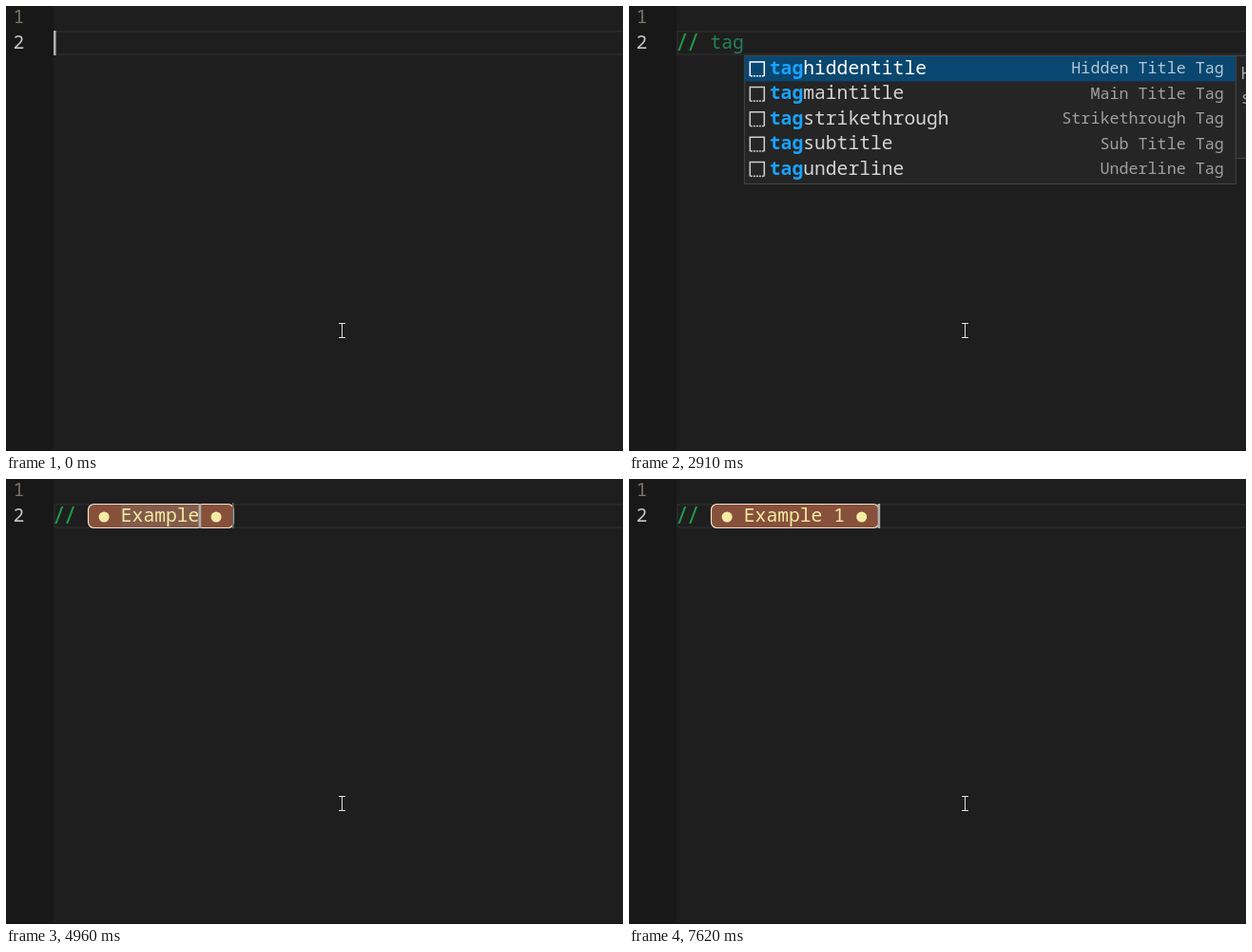
Recreate the animation shown at these times as an HTML page with a canvas. Size 649 by 469 pixels, loop 8000 ms.

```html
<!DOCTYPE html>
<html lang="en">
<head>
<meta charset="utf-8">
<title>Editor snippet</title>
<style>
html, body { margin: 0; width: 100%; height: 100%; overflow: hidden; background: #1e1e1e; }
canvas { display: block; }
</style>
</head>
<body>
<canvas id="c" width="649" height="469"></canvas>
<script>
const ctx = document.getElementById('c').getContext('2d');
const LOOP = 8000, CHAR = 11.8, LEFT = 50, ROW = 26.4;
const MONO = '"Noto Sans Mono", "DejaVu Sans Mono", monospace';
const col = n => LEFT + n * CHAR;

const ITEMS = [
  ['taghiddentitle', 'Hidden Title Tag'],
  ['tagmaintitle', 'Main Title Tag'],
  ['tagstrikethrough', 'Strikethrough Tag'],
  ['tagsubtitle', 'Sub Title Tag'],
  ['tagunderline', 'Underline Tag'],
  ['trycatch', 'Try-Catch Statement']
];

// Each step starts at `at`; caret is a column, null while blinked off.
const MAIN = 'Main Title Text';
const STEPS = [
  { at: 0, caret: 0 },
  { at: 200, typed: '/', caret: 1 },
  { at: 460, typed: '//', caret: 2 },
  { at: 990, typed: '//', caret: null },
  { at: 1060, typed: '//', caret: 3 },
  { at: 1590, typed: '//', caret: null },
  { at: 1990, typed: '// t', caret: 4, pick: 0 },
  { at: 2250, typed: '// ta', caret: 5, pick: 0 },
  { at: 2450, typed: '// tag', caret: 6, pick: 0 },
  { at: 2910, typed: '// tag', caret: null, pick: 0 },
  { at: 3440, typed: '// tag', caret: 6, pick: 1 },
  { at: 3900, tag: MAIN, caret: 21, selected: true, live: true },
  { at: 4430, tag: MAIN, caret: 21, selected: true, live: true, boxed: true },
  { at: 4560, tag: MAIN, caret: null, selected: true, live: true, boxed: true },
  { at: 4960, tag: 'Example', caret: 13, live: true, boxed: true },
  { at: 5640, tag: 'Example', caret: null, live: true, boxed: true },
  { at: 6040, tag: 'Example ', caret: 14, live: true, boxed: true },
  { at: 6570, tag: 'Example ', caret: null, live: true, boxed: true },
  { at: 6700, tag: 'Example 1', caret: 15, live: true, boxed: true },
  { at: 7160, tag: 'Example 1', caret: null, live: true, boxed: true },
  { at: 7620, tag: 'Example 1', caret: 18, boxed: true }
];

function rect(x, y, w, h, fill) {
  ctx.fillStyle = fill;
  ctx.fillRect(x, y, w, h);
}

function frame(x, y, w, h, fill, line) {
  rect(x, y, w, h, line);
  rect(x + 1, y + 1, w - 2, h - 2, fill);
}

// Writes on a fixed grid so that columns line up.
function write(str, x, y, fill, size = 19.67, step = CHAR, weight = 400) {
  ctx.font = `${weight} ${size}px ${MONO}`;
  ctx.textAlign = 'center';
  ctx.fillStyle = fill;
  [...str].forEach((ch, i) => ctx.fillText(ch, x + (i + 0.5) * step, y));
}

function dot(x, y, r, fill) {
  ctx.fillStyle = fill;
  ctx.beginPath();
  ctx.arc(x, y, r, 0, 7);
  ctx.fill();
}

function base(highlight) {
  rect(0, 0, 649, 469, '#1e1e1e');
  rect(0, 0, LEFT, 469, '#181818');
  rect(0, 468, 649, 1, '#151313');
  write('1', 7.5, 18, '#7d7468');
  write('2', 7.5, 45, '#c6c6c6');
  if (highlight) {
    ctx.strokeStyle = '#282828';
    ctx.lineWidth = 2;
    ctx.strokeRect(51, 27, 610, 24);
  }
}

function slashes(n) {
  write('//'.slice(0, n), LEFT, 46.5, '#1f9d49', 24.5);
}

function icon(x, y, color) {
  ctx.strokeStyle = color;
  ctx.lineWidth = 1.5;
  ctx.beginPath();
  ctx.moveTo(x, y + 15);
  ctx.lineTo(x, y);
  ctx.lineTo(x + 15, y);
  ctx.lineTo(x + 15, y + 15);
  ctx.stroke();
  for (let i = 0; i < 5; i++) rect(x + 0.5 + i * 3, y + 14, 2, 1.5, color);
}

function popup(x, query, pick) {
  const items = query === 'tag' ? ITEMS.slice(0, 5) : ITEMS;
  const side = x + 517;
  frame(side, 52, 200, 109, '#252526', '#454545');
  write(pick ? 'Main Title' : 'Hidden Title', side + 6, 77, '#a8a8a8', 17.5, 10.2);
  write(pick ? '---' : 'snippet', side + 6, 102.5, '#a0a0a0', 17.5, 10.2);
  if (!pick) rect(side + 19, 134, 60, 14, '#9cdcfe');

  frame(x, 52, 518, items.length * ROW + 4, '#252526', '#454545');
  items.forEach(([label, detail], i) => {
    const y = 53 + i * ROW, on = i === pick;
    if (on) rect(x + 1, y, 516, ROW, '#094771');
    icon(x + 6.5, y + 6, on ? '#ffffff' : '#d0d0d0');
    let next = 0;
    [...label].forEach((ch, k) => {
      const hit = ch === query[next];
      if (hit) next++;
      const color = hit ? '#18a3ff' : on ? '#ffffff' : '#d4d4d4';
      write(ch, x + 27 + k * CHAR, y + 19, color, 19.67, CHAR, hit ? 700 : 400);
    });
    write(detail, x + 505 - detail.length * 10.03, y + 18.3, on ? '#b5c8d5' : '#a0a0a0', 16.7, 10.03);
  });
}

function drawTag({ tag, selected, live, boxed }) {
  const n = tag.length, end = col(9 + n);
  const ink = boxed ? '#f3eca2' : '#1fbc58';
  if (boxed) {
    ctx.beginPath();
    ctx.roundRect(86.5, 26.5, end - 85.8, 25, 6);
    ctx.fillStyle = '#87503b';
    ctx.fill();
    ctx.strokeStyle = '#f0e6cf';
    ctx.lineWidth = 1.2;
    ctx.stroke();
  }
  if (selected) rect(col(6), 26, n * CHAR, 26, boxed ? 'rgba(64,92,121,.4)' : '#405c79');
  else if (live) rect(col(6), 27, n * CHAR, 24, 'rgba(124,124,124,.25)');
  if (selected) {
    [...tag].forEach((ch, i) => ch === ' ' && dot(col(6.5 + i), 39, 1.2, '#80909d'));
  }
  write(tag, col(6), 45, ink);
  dot(col(4.5), 40, 5.5, ink);
  dot(col(7.5 + n), 40, 5.5, ink);
  if (!boxed) rect(col(4.5) - 2, 39, 4, 1, '#177d3d');
  if (live) rect(end - 0.8, 25, 1.6, 27, '#6b6b6b');
}

function pointer() {
  const bar = (grow, fill) => {
    rect(353 - grow, 334 - grow, 1 + 2 * grow, 16 + 2 * grow, fill);
    for (const y of [334, 349]) rect(350 - grow, y - grow, 7 + 2 * grow, 1 + 2 * grow, fill);
  };
  bar(0.5, '#111');
  bar(0, '#e8e8e8');
}

function draw(now) {
  const t = now % LOOP;
  const s = STEPS.findLast(step => step.at <= t);
  base(!s.selected);
  if (s.tag) {
    slashes(2);
    drawTag(s);
  } else if (s.typed) {
    const word = s.typed.slice(3);
    slashes(Math.min(2, s.typed.length));
    write(word, col(3), 45, '#24805a');
    if (word) popup(col(s.typed.length), word, s.pick);
  }
  if (s.caret !== null) rect(col(s.caret) - (s.caret ? 0.8 : 0), 26, 2.6, 26, '#aeafad');
  pointer();
}

const start = performance.now();
function tick() {
  draw(performance.now() - start);
  requestAnimationFrame(tick);
}
tick();
</script>
</body>
</html>
```
